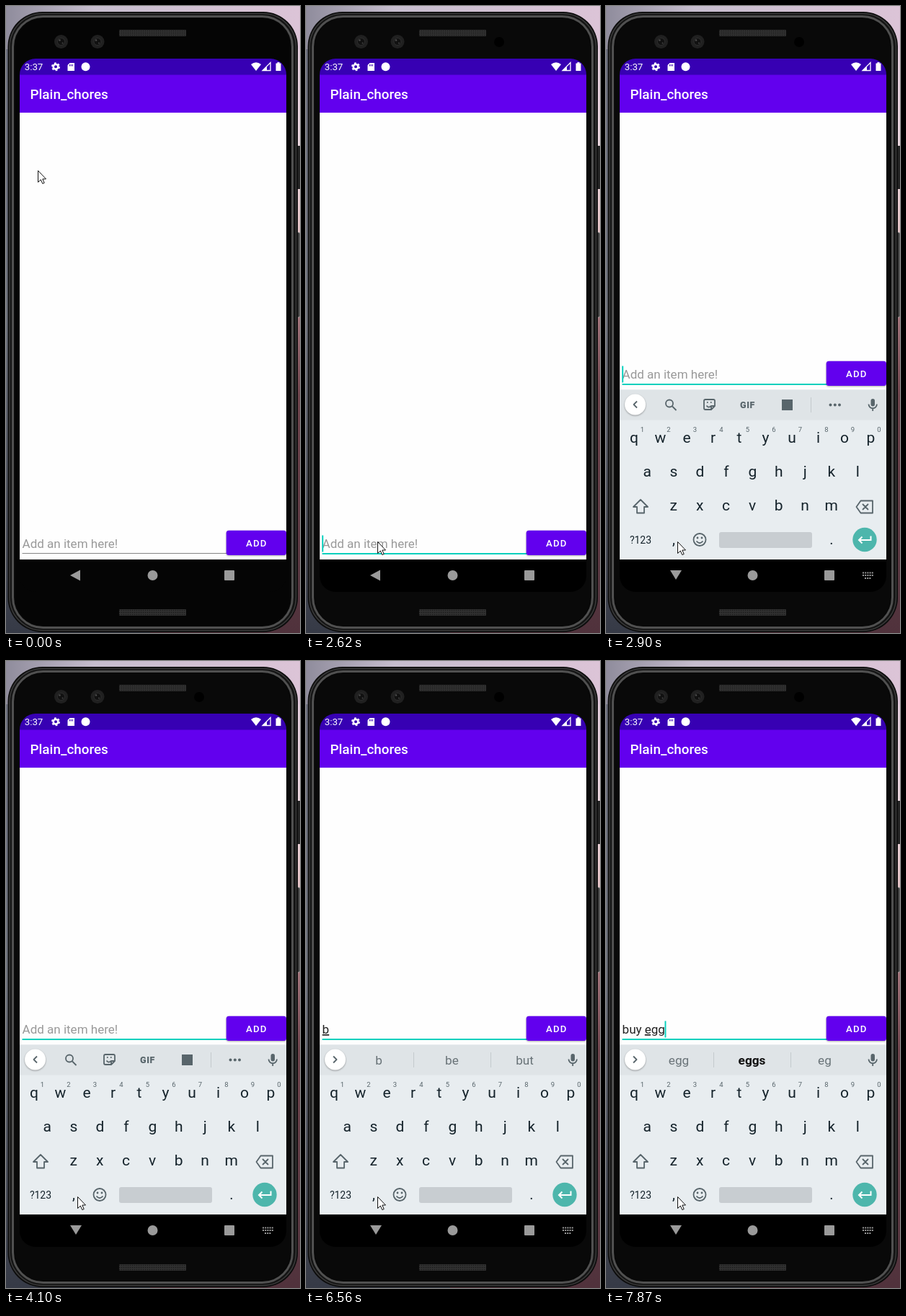
Write an HTML page that moves like this. It is 408x870 px and loops after 7990 ms.

```html
<!DOCTYPE html>
<html lang="en">
<head>
<meta charset="utf-8">
<title>To-do list demo</title>
<style>
  html, body { margin: 0; width: 100%; height: 100%; overflow: hidden; background: #222; }
  svg { display: block; width: 100%; height: 100%; }
  text { font-family: Roboto, sans-serif; white-space: pre; }
  .mid { text-anchor: middle; }
  .line { fill: none; stroke: #58656b; stroke-width: 1.8; stroke-linejoin: round; }
  .word { font-size: 17.2px; fill: #697378; }
  .best { font-weight: 700; fill: #111; }
  .composing { text-decoration: underline; text-decoration-thickness: 1px; }
  .raised { filter: drop-shadow(0 1px 1px #0005); }
</style>
</head>
<body>
<svg viewBox="0 0 408 870" preserveAspectRatio="none">
  <defs>
    <linearGradient id="sky">
      <stop offset="0" stop-color="#8f8c9c"/><stop offset=".3" stop-color="#c6bdce"/>
      <stop offset="1" stop-color="#dcc4d7"/>
    </linearGradient>
    <linearGradient id="dusk" x2="0" y2="1">
      <stop offset="0" stop-color="#dac4d6"/><stop offset=".25" stop-color="#ead6dc"/>
      <stop offset=".38" stop-color="#dfbcbe"/><stop offset=".5" stop-color="#a0737a"/>
      <stop offset=".62" stop-color="#6e444c"/><stop offset="1" stop-color="#50323c"/>
    </linearGradient>
    <linearGradient id="shore" x2="0" y2="1">
      <stop offset="0" stop-color="#6d7080"/><stop offset=".5" stop-color="#70747f"/>
      <stop offset="1" stop-color="#363a46"/>
    </linearGradient>
    <pattern id="mesh" width="3" height="3" patternUnits="userSpaceOnUse">
      <rect width="3" height="3" fill="#303030"/><circle cx="1.5" cy="1.5" r=".8" fill="#1a1a1a"/>
    </pattern>
    <clipPath id="screen"><rect x="19" y="73" width="370" height="740" rx="22"/></clipPath>
    <clipPath id="app"><rect x="19" y="148" width="370" height="620"/></clipPath>
  </defs>

  <!-- wallpaper and phone -->
  <rect width="408" height="870" fill="url(#dusk)"/>
  <rect width="200" height="870" fill="url(#shore)"/>
  <rect width="408" height="60" fill="url(#sky)"/>
  <rect x="402" y="194" width="8" height="60" rx="2" fill="#242424"/>
  <rect x="402" y="314" width="6" height="118" rx="2" fill="#3a3a3a" stroke="#aaa" stroke-width=".8"/>
  <rect x="2.500" y="8" width="402.500" height="861" rx="48" fill="#0d0d0d"/>
  <rect x="5" y="10.500" width="397.500" height="856" rx="46" fill="#141414" stroke="#3a3a3a" stroke-width="1.600"/>
  <rect x="9.500" y="14.500" width="388" height="848" rx="42" fill="#080808" stroke="#505050" stroke-width="3"/>
  <rect id="body" x="13" y="17" width="381" height="843" rx="39"/>
  <rect x="157" y="33" width="93" height="9" rx="1" fill="url(#mesh)"/>
  <rect x="157" y="837" width="93" height="9" rx="1" fill="url(#mesh)"/>
  <g id="lenses"></g>
  <circle id="sensor" cx="268" cy="50" r="7" fill="#000"/>

  <g clip-path="url(#screen)">
    <rect id="nav" x="19" y="768" width="370" height="45"/>
    <rect x="19" y="148" width="370" height="620" fill="#fefefe"/>
    <rect x="19" y="73" width="370" height="23" fill="#3700b3"/>
    <rect x="19" y="95.500" width="370" height="52.500" fill="#6200ee"/>
  </g>
  <g fill="#fff">
    <text x="25.700" y="89" font-size="13.300">3:37</text>
    <circle cx="69" cy="84.300" r="3.300" fill="none" stroke="#fff" stroke-width="2.600"/>
    <circle cx="69" cy="84.300" r="5.100" fill="none" stroke="#fff" stroke-width="1.800" stroke-dasharray="2.670"/>
    <path d="M88.500 79H95V90H85.500V82Z"/>
    <path d="M88.500 81v2.500m2-2.500v2.500m2-2.500v2.500" stroke="#3700b3"/>
    <circle cx="110.500" cy="84.300" r="6"/>
    <path d="M340 81Q347 75.500 354 81L347 90Z"/>
    <path d="M367 78.500V89.500H356Z" fill="none" stroke="#fff" stroke-width="1.300"/>
    <path d="M362 84v5.500h-6z"/>
    <path d="M374.500 79.500h2v-1.500h3v1.500h2V90h-7z"/>
    <text x="33.500" y="129" font-size="18.850" font-weight="500">Plain_chores</text>
  </g>

  <g clip-path="url(#app)">
    <g id="entry">
      <text id="hint" x="22.600" y="752" font-size="17" fill="#999">Add an item here!</text>
      <text x="22.600" y="752" font-size="17" fill="#222"><tspan id="done"></tspan><tspan id="composing" class="composing"></tspan></text>
      <rect id="rule" x="22.500" width="284"/>
      <rect id="caret" y="734.500" width="1.900" height="23" fill="#03d0bd"/>
      <rect class="raised" x="305.700" y="727.700" width="83.300" height="34.300" rx="3.500" fill="#6200ee"/>
      <text x="333" y="750" font-size="13.200" font-weight="500" letter-spacing="1.180" fill="#fff">ADD</text>
    </g>
    <g id="keyboard">
      <rect x="19" y="532.500" width="370" height="236" fill="#e8edf0"/>
      <rect x="19" y="532.500" width="370" height="42" fill="#dfe4e7"/>
      <circle class="raised" cx="40.500" cy="553" r="14.500" fill="#fff"/>
      <path id="chevron" class="line"/>
      <rect x="367.500" y="545" width="5.500" height="10.500" rx="2.750" fill="#58656b"/>
      <path class="line" d="M364.500 552.500a5.700 5.700 0 0 0 11.400 0M370.200 558.500v3.500"/>
      <g id="tools">
        <circle class="line" cx="88" cy="551.500" r="5"/><path class="line" d="M92 555.500l5.500 5.500"/>
        <path class="line" d="M138 546h11q2 0 2 2v7l-5 5h-8q-2 0-2-2v-10q0-2 2-2zM151 555h-5v5M139.500 554.500q3 4 6 .5M140 550h1.500m3.500 0h1.500"/>
        <text class="mid" x="196.500" y="557.500" font-size="12.500" font-weight="900" letter-spacing=".6" fill="#58656b">GIF</text>
        <rect x="244" y="546" width="15" height="15" fill="#58656b"/>
        <path d="M284.500 543v21" stroke="#c3cacd"/>
        <g fill="#58656b"><circle cx="311.500" cy="553.500" r="2"/><circle cx="317.800" cy="553.500" r="2"/><circle cx="324" cy="553.500" r="2"/></g>
      </g>
      <g id="words">
        <path d="M149.500 543v21M256.500 543v21" stroke="#c3cacd"/>
        <text class="mid word" x="101" y="560"></text>
        <text class="mid word" x="202.500" y="560"></text>
        <text class="mid word" x="303.500" y="560"></text>
      </g>
      <g id="keys" fill="#15232b"></g>
      <path class="line" d="M48 685L58 695H53V703.500H43V695H38Z"/>
      <path class="line" d="M353.500 686.500H370V703.500H353.500L347.500 695ZM356 691l8 8m0-8l-8 8"/>
      <circle class="line" cx="130" cy="740.500" r="8.500"/>
      <path class="line" d="M125.500 742.500q4.500 5.500 9 0"/>
      <g fill="#58656b"><circle cx="127" cy="738" r="1.400"/><circle cx="133" cy="738" r="1.400"/></g>
      <rect x="157" y="730" width="129" height="22" rx="3" fill="#c8cdd1"/>
      <circle cx="359" cy="740.500" r="16.700" fill="#4db6ac"/>
      <path d="M367.500 735.500v5.500H351m4.500-4.500l-4.500 4.500 4.500 4.500" fill="none" stroke="#fff" stroke-width="2"/>
    </g>
  </g>

  <g fill="#9a9a9a">
    <path id="back"/>
    <circle cx="203.500" cy="790" r="7"/>
    <rect x="303" y="783" width="14" height="14" rx="1"/>
    <path id="switcher" d="M356 786.500h15m-15 3.500h15m-12 4h9" fill="none" stroke="#9a9a9a" stroke-width="2" stroke-dasharray="2 1.200"/>
  </g>
  <path id="cursor" d="M.5.5V16.500L4.300 13L6.800 18.500L9.200 17.500L6.800 12H11.500Z" fill="#fff" stroke="#111"/>
</svg>

<script>
const $ = id => document.getElementById(id);
const LOOP = 7990;

// Each entry: [start ms, value]; values hold until the next start.
const pointer = [
  [0, [44, 228]], [150, null], [300, [40, 364]], [420, [63, 369]],
  [1510, [120, 581]], [1630, [152, 632]], [1750, [168, 672]], [1870, [164, 688]], [1990, [150, 691]],
  [2140, [128, 712]], [2260, [108, 734]], [2380, [99, 743]]
];
const caretOn = [
  [0, false], [2500, true], [3060, false], [3600, true], [4100, false], [4530, true], [5060, false],
  [5180, true], [5920, false], [6040, true], [6560, false], [6680, true]
];
// Values: finished text, text being composed, suggestions, bold middle suggestion.
const typing = [
  [0, ["", ""]],
  [5180, ["", "b"]],
  [5300, ["", "b", "b be but"]],
  [6040, ["", "bu", "bu but build"]],
  [6160, ["", "b", "b be but"]],
  [6680, ["", "bu", "bu but build"]],
  [6830, ["", "buy", "buy but buying"]],
  [7110, ["buy ", "", "a the it"]],
  [7240, ["buy ", "e", "e eggs eat"]],
  [7750, ["buy ", "eg", "eg eggs ex"]],
  [7870, ["buy ", "egg", "egg eggs eg", true]]
];
const FOCUS = 2500, KEYBOARD = 2770, KEYBOARD_UP = 2900;

const at = (track, t) => track.findLast(([start]) => start <= t)[1];
const show = (id, on) => $(id).setAttribute("visibility", on ? "visible" : "hidden");
const set = (id, attrs) => Object.entries(attrs).forEach(([k, v]) => $(id).setAttribute(k, v));

const label = (text, x, y, size) => `<text class="mid" x="${x}" y="${y}" font-size="${size}">${text}</text>`;
const row = (letters, x, y) => [...letters].map((c, i) => label(c, x + 36.5 * i, y, 21)).join("");
$("keys").innerHTML =
  row("qwertyuiop", 39, 606) + row("asdfghjkl", 57.3, 653) + row("zxcvbnm", 93.6, 700) +
  `<g fill="#58656b">${[..."1234567890"].map((c, i) => label(c, 50.3 + 36.5 * i, 590.5, 9.5)).join("")}</g>` +
  label("?123", 48, 746, 14) + label(",", 94, 747, 20) + label(".", 313, 747, 20);
$("lenses").innerHTML = [76.5, 127].map(x => `<circle cx="${x}" cy="49.5" r="9.5" fill="#202020"/>
  <circle cx="${x}" cy="49.5" r="5" fill="#111" stroke="#303030"/>
  <circle cx="${x - 2}" cy="47.5" r="1.3" fill="#4b4b4b"/><circle cx="${x + 2}" cy="51.5" r="1" fill="#444"/>`).join("");

function draw(t) {
  const focused = t >= FOCUS, keyboard = t >= KEYBOARD;
  const [done, composing, words, bold] = at(typing, t);

  set("body", { fill: focused ? "#090909" : "#050505" });
  set("nav", { fill: focused ? "#000" : "#050505" });
  show("sensor", focused);
  set("entry", { transform: `translate(0 ${keyboard ? -235 : 0})` });
  set("rule", focused ? { y: 759, height: 2, fill: "#03d0bd" } : { y: 759, height: 1, fill: "#858585" });
  show("hint", !done && !composing);
  $("done").textContent = done;
  $("composing").textContent = composing;
  const width = done || composing ? $("done").parentNode.getComputedTextLength() : 0;
  set("caret", { x: 22.2 + width });
  show("caret", at(caretOn, t));

  $("keyboard").style.display = keyboard ? "" : "none";
  set("keyboard", { transform: `translate(0 ${t < KEYBOARD_UP ? 40 : 0})` });
  $("tools").style.display = words ? "none" : "";
  $("words").style.display = words ? "" : "none";
  if (words) {
    const list = words.split(" ");
    $("words").querySelectorAll("text").forEach((el, i) => {
      el.textContent = list[i];
      el.classList.toggle("best", i === 1 && !!bold);
    });
  }
  set("chevron", { d: words ? "M38 548.5l4.5 4.5-4.5 4.5" : "M43 548.5l-4.5 4.5 4.5 4.5" });
  set("back", { d: keyboard ? "M89 783H105L97 796Z" : "M103 782.5V797.5L89 790Z" });
  show("switcher", keyboard);

  const tip = at(pointer, t);
  show("cursor", tip);
  if (tip) set("cursor", { transform: `translate(${tip})` });
}

function tick() {
  draw(performance.now() % LOOP);
  requestAnimationFrame(tick);
}
tick();
</script>
</body>
</html>
```
